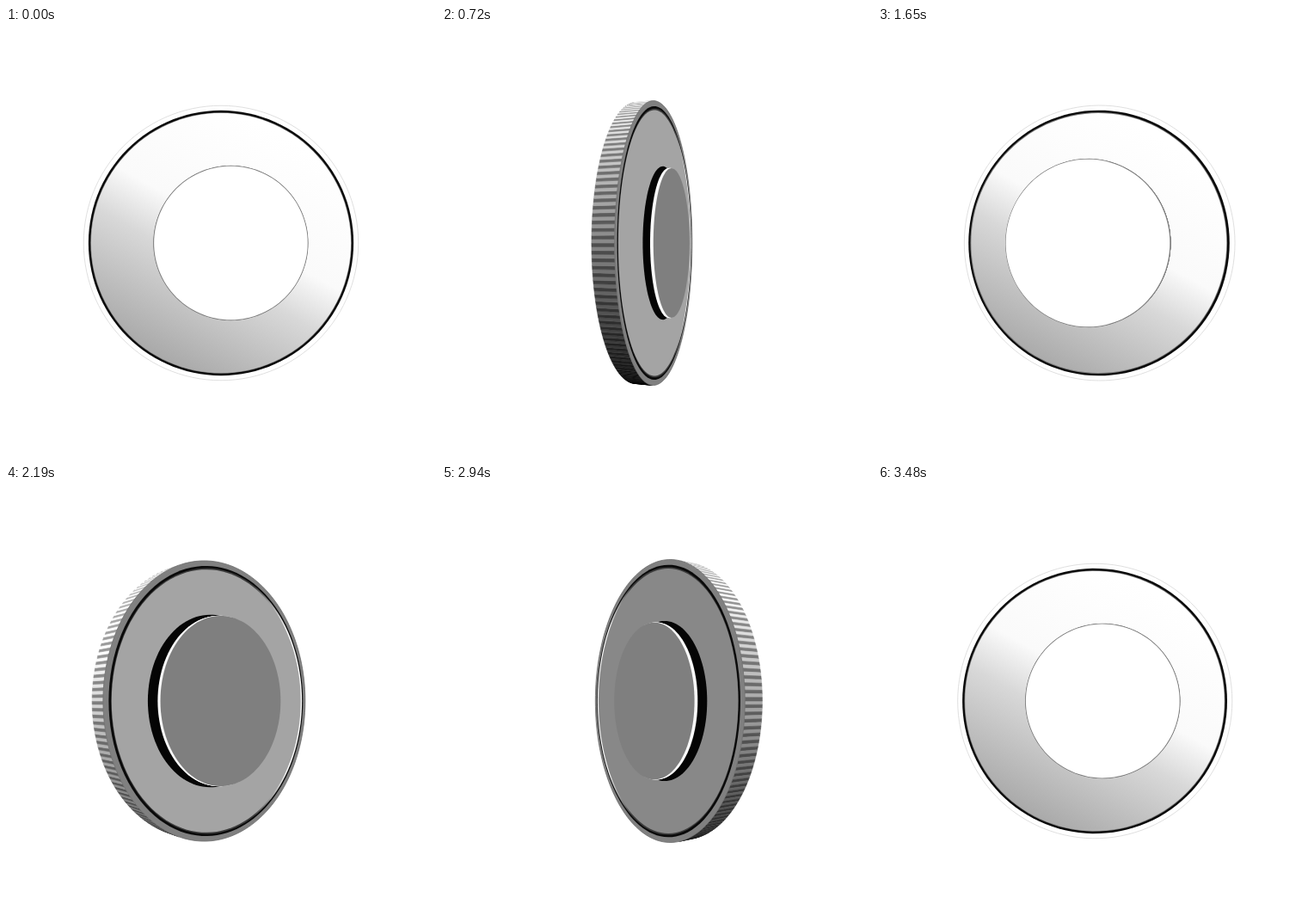
Write an HTML page with a canvas that moves like this. It is 500 px wide and 500 px high and loops after 3510 ms.

```html
<!DOCTYPE html>
<html lang="en">
<head>
<meta charset="utf-8">
<title>Spinning coin</title>
<style>
  html, body { margin: 0; width: 100%; height: 100%; overflow: hidden; background: #fff; }
  canvas { display: block; width: 500px; height: 500px; }
</style>
</head>
<body>
<canvas id="stage" width="500" height="500"></canvas>
<script>
const ctx = document.getElementById('stage').getContext('2d');
const LOOP = 3510, STEP = 30;
const CAMERA = 490, RADIUS = 156.5, HALF = 10, RAISE = 8, RIDGES = 160;
const EMBLEMS = [{ x: 11, r: 86 }, { x: -6, r: 94 }];

let sin = 0, cos = 1;

const clamp = v => Math.min(1, Math.max(0, v));
const mix = (a, b, k) => a + (b - a) * k;
const smooth = v => { v = clamp(v); return v * v * (3 - 2 * v); };
const grey = v => { v = Math.round(v); return `rgb(${v},${v},${v})`; };

// Turn a point about the vertical axis and project it in perspective.
function project(x, y, z) {
  const k = CAMERA / (CAMERA + x * sin - z * cos);
  return [250 + (x * cos + z * sin) * k, 250 + y * k];
}

function trace(points) {
  ctx.beginPath();
  points.forEach(p => ctx.lineTo(p[0], p[1]));
  ctx.closePath();
}

function disc(x, r, z, fill) {
  const points = [];
  for (let i = 0; i < 120; i++) {
    const a = i * Math.PI / 60;
    points.push(project(x + r * Math.cos(a), r * Math.sin(a), z));
  }
  trace(points);
  ctx.fillStyle = fill;
  ctx.fill();
}

function gradient(from, to, stops) {
  const g = ctx.createLinearGradient(...from, ...to);
  stops.forEach(([at, v]) => g.addColorStop(at, grey(v)));
  return g;
}

function drawWall() {
  const n = RIDGES * 2;
  ctx.lineWidth = 0.6;
  for (let i = 0; i < n; i++) {
    const a = i * 2 * Math.PI / n, b = a + 2 * Math.PI / n;
    const mid = (a + b) / 2;
    if (-Math.cos(mid) * CAMERA * sin < RADIUS) continue;
    const corner = (t, z) => project(RADIUS * Math.cos(t), RADIUS * Math.sin(t), z);
    trace([corner(a, -HALF), corner(b, -HALF), corner(b, HALF), corner(a, HALF)]);
    const light = 0.44 - 0.5 * Math.sin(mid) + 1.1 * (1 - Math.abs(sin));
    ctx.fillStyle = ctx.strokeStyle = grey(255 * clamp(light * (i % 2 ? 0.65 : 1.1)));
    ctx.fill();
    ctx.stroke();
  }
}

function faceFill(dim) {
  const side = 150 + 14 * Math.sign(sin);
  return gradient([330, 130], [185, 390],
    [[0, 255], [0.42, 250], [0.6, 216], [1, 168]].map(([at, front]) => [at, mix(front, side, dim)]));
}

// The inner wall of the groove catches light only on the far side.
function grooveFill(dim) {
  const far = Math.sign(sin) || 1;
  const dark = mix(125, 60, dim);
  return gradient(project(0, 0, HALF), project(149 * far, 0, HALF),
    [[0, dark], [0.35, dark], [0.8, mix(125, 250, dim)]]);
}

function drawFace(emblem, dim) {
  disc(0, RADIUS, HALF, grey(mix(255, 128, dim)));
  ctx.strokeStyle = grey(mix(215, 110, dim));
  ctx.lineWidth = 0.8;
  ctx.stroke();

  const near = -Math.sign(sin), depth = Math.abs(sin);
  const shift = 0.6 + 1.6 * depth;
  disc(0, 151, HALF, grey(10));
  disc(0, 148.6, HALF, grooveFill(dim));
  disc(near * shift * depth, 148.6 - shift, HALF, faceFill(dim));

  // Contact shadow, side wall with a lit bevel, then the top.
  const { x, r } = emblem;
  disc(x + near * 7 * dim, r + 2 * dim, HALF, grey(mix(130, 5, dim)));
  for (let z = 0; z < RAISE; z++) {
    const bevel = z > RAISE - 4;
    disc(x, r + 1, HALF + z, grey(bevel ? mix(130, 250, dim) : mix(130, 5, dim)));
  }
  disc(x + near * -0.8 * dim, r + 1 - Math.max(1 - dim, 0.2), HALF + RAISE, grey(mix(255, 127, dim)));
}

function draw(time) {
  const t = Math.floor(time % LOOP / STEP) * STEP;
  const turn = 2 * Math.PI * t / LOOP;
  const back = Math.cos(turn) < 0;
  const angle = back ? turn - Math.PI : turn;
  sin = Math.sin(angle);
  cos = Math.cos(angle);
  const dim = smooth((Math.asin(Math.abs(sin)) * 180 / Math.PI - 10) / 28);

  ctx.fillStyle = '#fff';
  ctx.fillRect(0, 0, 500, 500);
  drawWall();
  if (CAMERA * cos > HALF) drawFace(EMBLEMS[back ? 1 : 0], dim);
}

const start = performance.now();
function tick() {
  draw(performance.now() - start);
  requestAnimationFrame(tick);
}
tick();
</script>
</body>
</html>
```
